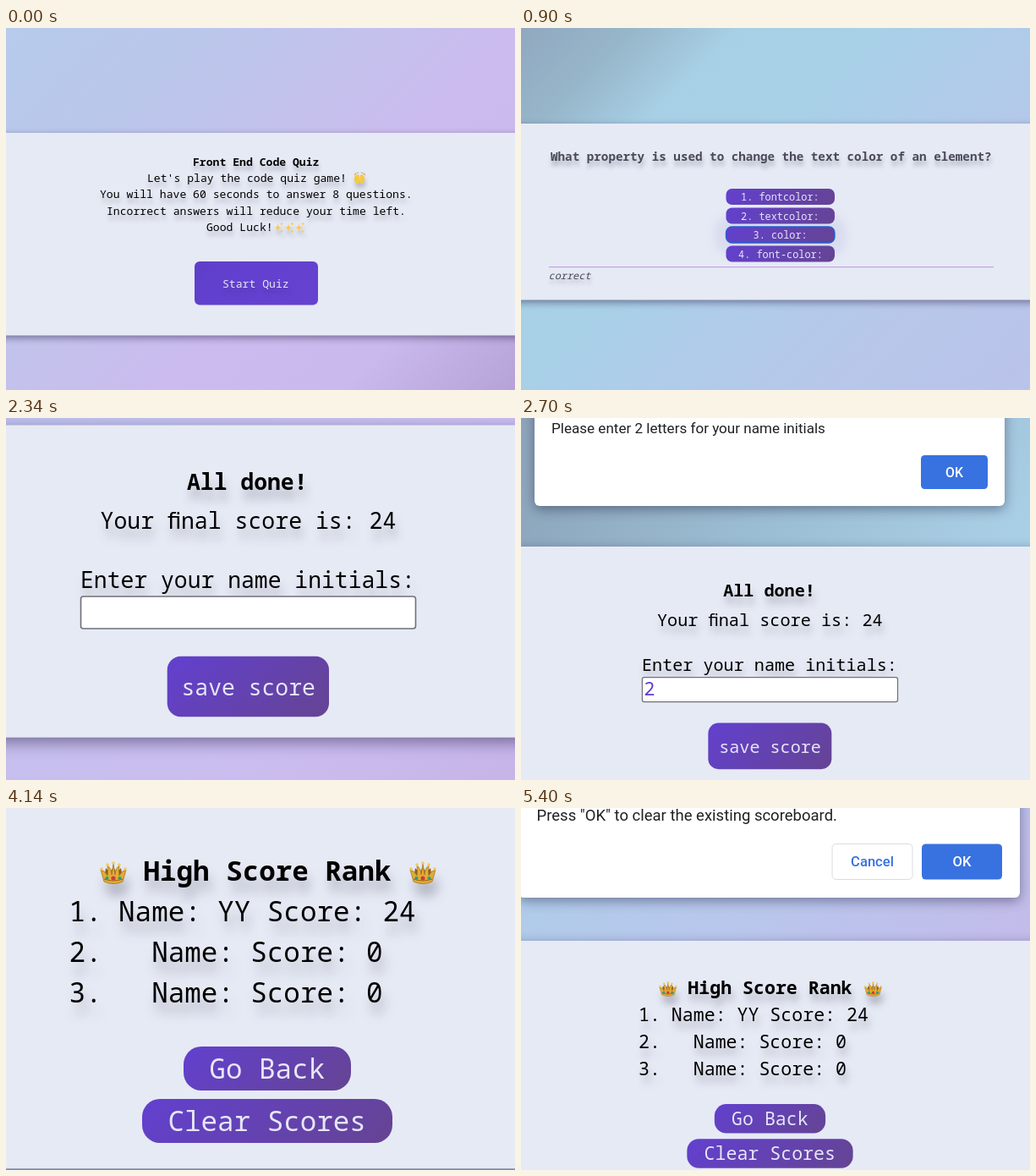
An HTML page for the animation above (6300 ms loop, 602x428 px).

```html
<!DOCTYPE html>
<html lang="en">
<head>
<meta charset="utf-8">
<title>Code quiz</title>
<style>
  html, body { margin: 0; height: 100%; overflow: hidden; background: #e6eaf5; }
  svg { display: block; width: 602px; height: 428px; }
  text { font-family: "Noto Sans Mono", "DejaVu Sans Mono", monospace; font-weight: 500; white-space: pre; }
  .bold { font-weight: 700; }
  .shade { filter: drop-shadow(.13em .46em .2em rgba(40, 40, 60, .27)); }
  .light { fill: #e6e6f8; }
  .grey { fill: #4b4a5a; }
  .italic { font-style: italic; }
  .purple { fill: #6240cf; }
  .ui { font-family: Roboto, sans-serif; font-weight: 400; fill: #202124; }
  .action { font-family: Roboto, sans-serif; text-anchor: middle; }
  .dialog { fill: #fff; filter: drop-shadow(0 4px 7px rgba(20, 20, 50, .42)); }
</style>
</head>
<body>
<svg id="stage" viewBox="0 0 602 428"></svg>
<script>
const SCENE_MS = 900;
const ADVANCE = 0.6; // monospace glyph width in em
const PURPLE = '0 #6240cf,1 #654493';
let gradients = 0;

const rect = (x, y, w, h, r, attrs) =>
  `<rect x="${x}" y="${y}" width="${w}" height="${h}" rx="${r}" ${attrs}/>`;

const text = (x, y, size, label, cls = '') =>
  `<text x="${x}" y="${y}" font-size="${size}" class="${cls}">${label}</text>`;

// Monospaced text sized by its character pitch
const mono = (x, y, pitch, label, cls = 'shade') => text(x, y, pitch / ADVANCE, label, cls);

const group = (x, y, scale, content) =>
  `<g transform="translate(${x} ${y}) scale(${scale})">${content}</g>`;

// Box filled with a 135 degree gradient
function gradientBox(x, y, w, h, r, stops, attrs = '') {
  const id = 'grad' + gradients++, cx = x + w / 2, cy = y + h / 2, d = (w + h) / 4;
  const marks = stops.split(',').map(s => {
    const [at, color] = s.split(' ');
    return `<stop offset="${at}" stop-color="${color}"/>`;
  }).join('');
  return `<linearGradient id="${id}" gradientUnits="userSpaceOnUse"
    x1="${cx - d}" y1="${cy - d}" x2="${cx + d}" y2="${cy + d}">${marks}</linearGradient>` +
    rect(x, y, w, h, r, `fill="url(#${id})" ${attrs}`);
}

const backdrop = stops => gradientBox(0, 0, 602, 428, 0, stops);

const panel = (top, bottom, k = 1) => rect(-60, top, 722, bottom - top, 0,
  `fill="#e6eaf5" style="filter:drop-shadow(0 ${3 * k}px ${4.5 * k}px rgba(35,25,65,.48))"`);

const button = (x, y, w, h, r, tx, ty, pitch, label) =>
  gradientBox(x, y, w, h, r, PURPLE) + mono(tx, ty, pitch, label, 'light');

const dialog = (x, w, bottom) => rect(x, -60, w, bottom + 60, 6, 'class="dialog"');

function action(x, y, w, h, label, primary = true) {
  const paint = primary ? 'fill="#3871e0"' : 'fill="#fff" stroke="#dadce0"';
  return rect(x, y, w, h, h / 9, paint) +
    `<text x="${x + w / 2}" y="${y + h * .64}" font-size="${h * .395}" class="action"
      fill="${primary ? '#fff' : '#3871e0'}">${label}</text>`;
}

const dot = (x, y, r, color) => `<circle cx="${x}" cy="${y}" r="${r}" fill="${color}"/>`;

const crown = (x, y) => group(x, y, 1, `<g class="shade" font-size="32">
  <path d="M5 21L7 8L12 13L16 7L20 13L25 8L27 21Z" fill="#8d5d1c"/>
  <path d="M5 24L1 10Q6 11 9 17Q10 11 9 5Q14 9 14 16L16 3L18 16Q18 9 23 5Q22 11 23 17Q26 11 31 10L27 24Q16 29 5 24Z"
    fill="#e3ac35" stroke="#a8731d" stroke-width=".8"/>
  <path d="M5 21Q16 25 27 21" fill="none" stroke="#9a6519" stroke-width="1.2"/>
  ${[[2, 9], [9, 4], [16, 2], [23, 4], [30, 9]].map(p => dot(...p, 1.8, '#f3cb58')).join('')}
  ${dot(16, 20, 2.6, '#c8403a')}${dot(8.5, 20, 2.1, '#2f9c7c')}${dot(23.5, 20, 2.1, '#2f9c7c')}</g>`);

const star = (x, y, r) => `<path fill="#f9cb55" d="M${x} ${y - r}Q${x} ${y} ${x + r} ${y}
  Q${x} ${y} ${x} ${y + r}Q${x} ${y} ${x - r} ${y}Q${x} ${y} ${x} ${y - r}Z"/>`;

const sparkles = x => star(x + 5.5, 236, 5.5) + star(x + 10, 231.5, 2.8) + star(x + 10, 240.5, 2.5);

const hands = `<g class="shade" font-size="13" fill="#f9c83c">
  <path d="M412 176Q411 182 416 185L418 182L417.5 174L415 173Z"/>
  <path d="M424 176Q425 182 420 185L418.8 182L418.7 174L421.5 173Z"/>
  <path d="M412.3 174L413.8 171.5M415.5 172L416.5 170.5M420.5 170.5L421.5 172M423 171.5L424.5 174"
    stroke="#b98a35" stroke-width="1"/></g>`;

// Score form; its origin is the baseline start of the input label
const scoreForm = (x, y, scale, value = '') => group(x, y, scale,
  mono(126, -116, 15.84, 'All done!', 'bold shade') +
  mono(23.5, -70, 15.9, 'Your \uFB01nal score is: 24') +
  mono(0, 0, 15.84, 'Enter your name initials:') +
  rect(.5, 10, 396, 38, 3, 'fill="#fff" stroke="#707078" stroke-width="1.6"') +
  mono(3, 38.5, 17.4, value, 'purple') +
  button(102.7, 80.7, 191.3, 71.5, 16, 119.5, 127, 15.84, 'save score'));

// Ranking; its origin is the baseline start of the first row
const ranking = (x, y, scale) => group(x, y, scale,
  crown(36.5, -71) + crown(402.5, -71) +
  mono(88, -48, 19.53, 'High Score Rank', 'bold shade') +
  ['1. Name: YY Score: 24', '2.   Name: Score: 0', '3.   Name: Score: 0']
    .map((row, i) => mono(0, 48 * i, 19.53, row)).join('') +
  button(135.5, 148, 198, 52, 21, 166, 186, 19.53, 'Go Back') +
  button(86.5, 210, 296, 52, 21, 117, 248, 19.53, 'Clear Scores'));

function intro() {
  const lines = [[167, "Let's play the code quiz game!"],
    [111, 'You will have 60 seconds to answer 8 questions.'],
    [119, 'Incorrect answers will reduce your time left.'], [237, 'Good Luck!']];
  return backdrop('0 #b7cbec,.2 #b9c7eb,.415 #c3c2ec,.585 #cbbbee,.8 #c9b9ec,1 #b6a2d6') +
    panel(124, 363.5) +
    mono(221, 162.5, 7.87, 'Front End Code Quiz', 'bold shade') +
    lines.map(([x, line], i) => mono(x, 182 + 19.4 * i, 7.87, line)).join('') +
    hands + `<g class="shade" font-size="13">${[316, 328.5, 341].map(sparkles).join('')}</g>` +
    gradientBox(223, 276, 146, 51.5, 6, '0 #5e3fc8,.3 #6240cf,1 #6642d0') +
    mono(256, 306.5, 7.87, 'Start Quiz', 'light shade');
}

function question() {
  const answers = [[260, '1. fontcolor:'], [260, '2. textcolor:'], [274.5, '3. color:'], [257, '4. font-color:']];
  const glow = 'fill="#d9dcef" style="filter:blur(5px)"';
  return backdrop('0 #90a8bf,.13 #97b6ca,.25 #a7cfe5,.42 #a8d0e7,.6 #b1cbea,.8 #b8c6ea,1 #bac3ea') +
    panel(113, 321.5) +
    mono(35, 157, 8.56, 'What property is used to change the text color of an element?', 'bold grey shade') +
    rect(229, 221, 156, 48, 20, glow) +
    answers.map(([x, label], i) =>
      button(242.5, 190 + 22.5 * i, 128.5, 19, 7, x, 204 + 22.5 * i, 7.14, label)).join('') +
    rect(242.5, 235, 128.5, 19, 7, 'fill="none" stroke="#2460d0" stroke-width="1.3"') +
    rect(33, 282, 526, 1.2, 0, 'fill="#c79fe3"') +
    mono(32.5, 296.5, 7.14, 'correct', 'grey italic shade');
}

const scenes = [
  intro(),
  question(),
  backdrop('0 #bdc0ec,.4 #c6bfee,.7 #cbbcf0,1 #c6b4e8') + panel(8.5, 377.7, 2) + scoreForm(88, 201, 1),
  backdrop('0 #8fa5bb,.13 #8ea8be,.4 #9bbdd3,.7 #a9cfe6,1 #abd0e8') + panel(152, 500, 1.5) +
    dialog(16, 556, 104) +
    text(36, 18, 17.07, 'Please enter 2 letters for your name initials', 'ui') +
    action(473, 44, 79, 40, 'OK') + scoreForm(143, 299, .763, '2'),
  backdrop('0 #a9c0e0,1 #a9c0e0') + panel(-60, 426.3, 2) + ranking(74.5, 134, 1),
  backdrop('0 #b4caea,.155 #b6c8ea,.45 #bcc5ec,.74 #c3bdec,1 #c6bbee') + panel(188, 500, 1.5) +
    dialog(-20, 642, 134) +
    '<path d="M110 0Q115 4 119 0M225 1.5Q229 2.5 231 0" fill="none" stroke="#202124" stroke-width="2"/>' +
    text(13.5, 39, 19, 'You will be directed to home page', 'ui') +
    action(500.5, 68, 88.5, 44, 'OK') + ranking(139, 287, .695),
  backdrop('0 #aecbea,.12 #b0cbea,.4 #b9c6ec,.7 #c2bcea,1 #c6bbee') + panel(157, 500, 1.5) +
    dialog(-3, 593, 106) +
    text(18.5, 15, 18.5, 'Press "OK" to clear the existing scoreboard.', 'ui') +
    action(368, 42.5, 95, 42, 'Cancel', false) + action(474, 42.5, 95, 42, 'OK') +
    ranking(139, 252, .663)
];

const stage = document.getElementById('stage');
stage.innerHTML = scenes.map(s => `<g display="none">${s}</g>`).join('');
const layers = [...stage.children];
let current = -1;

function draw(now) {
  const next = Math.floor(now / SCENE_MS) % layers.length;
  if (next !== current) {
    layers.forEach((layer, i) => layer.setAttribute('display', i === next ? 'inline' : 'none'));
    current = next;
  }
  requestAnimationFrame(draw);
}
draw(performance.now());
</script>
</body>
</html>
```
